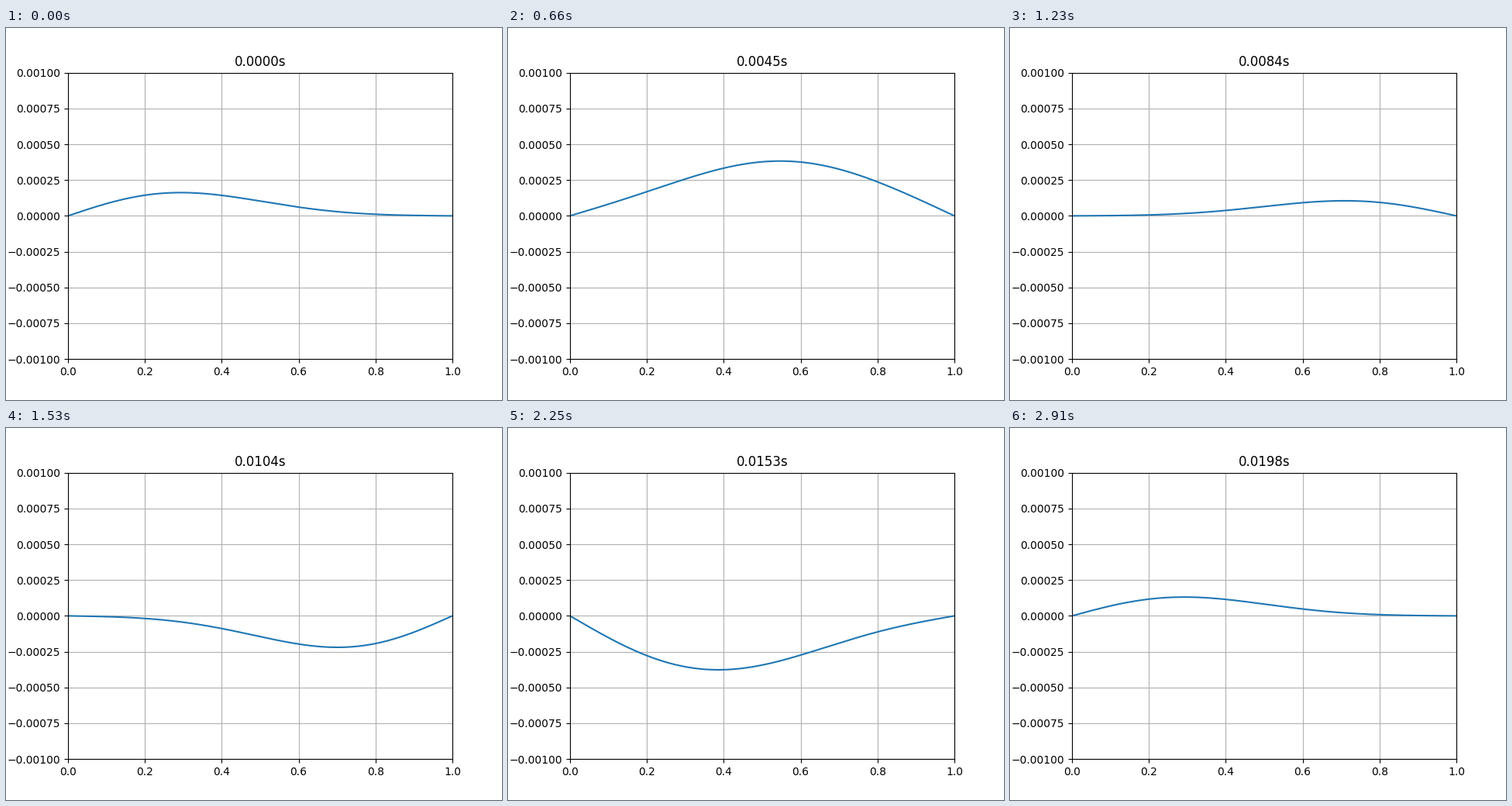
These frames come from a looping animation (640 by 480 pixels, 2940 ms). A matplotlib script:

```python
import numpy as np
import matplotlib.pyplot as plt
from matplotlib.animation import FuncAnimation

FRAMES = 98
PERIOD = 0.02                     # fundamental period of the string, s
DELAY = 0.001                     # time since the strike at t = 0, s
AMPS = (3.695e-4, 1.19e-4, 0.137e-4)

x = np.linspace(0, 1, 201)


def shape(t):
    """Struck string: sum of its standing-wave modes."""
    phase = 2 * np.pi * (t + DELAY) / PERIOD
    return sum(a * np.sin(n * phase) * np.sin(n * np.pi * x)
               for n, a in enumerate(AMPS, start=1))


fig, ax = plt.subplots(figsize=(6.4, 4.8), dpi=100)
line, = ax.plot(x, shape(0))
ax.set_xlim(0, 1)
ax.set_ylim(-0.001, 0.001)
ax.grid(True)
title = ax.set_title("0.0000s")


def update(i):
    t = i * PERIOD / FRAMES
    line.set_ydata(shape(t))
    title.set_text(f"{t:.4f}s")
    return line, title


anim = FuncAnimation(fig, update, frames=FRAMES, interval=30,
                     repeat=True, repeat_delay=0, blit=False)
plt.show()
```
